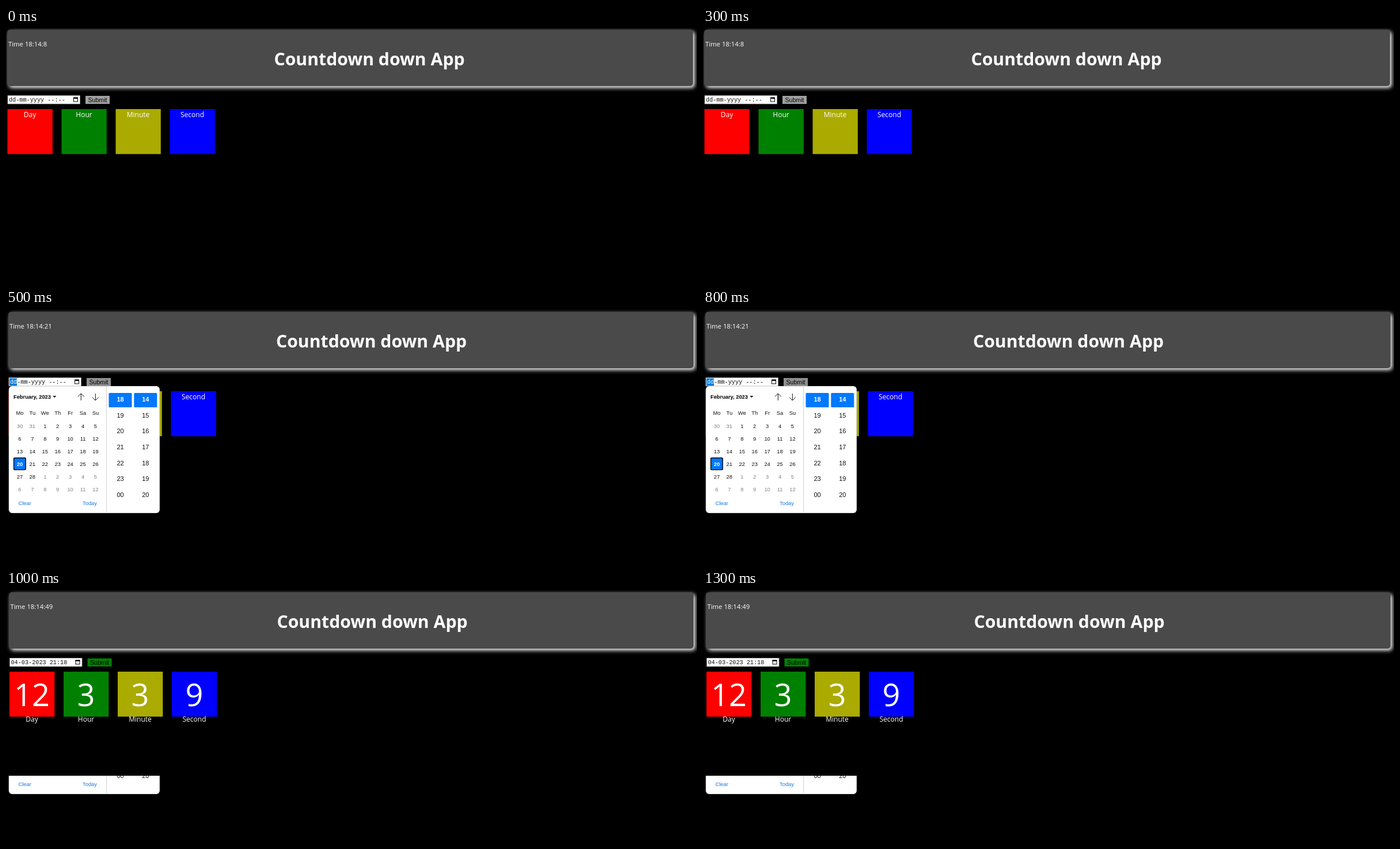
An HTML page with a canvas for the animation above (1500 ms loop, 1200 by 440 pixels).

```html
<!DOCTYPE html>
<html lang="en">
<head>
<meta charset="utf-8">
<title>Countdown</title>
<style>
  html, body { margin: 0; width: 100%; height: 100%; overflow: hidden; background: #000; }
  canvas { display: block; }
</style>
</head>
<body>
<canvas id="stage" width="1200" height="440"></canvas>
<script>
const ctx = document.getElementById('stage').getContext('2d');
const UI = '"Open Sans", sans-serif';
const ARIAL = '"Liberation Sans", sans-serif';
const MONO = '"Liberation Mono", monospace';
const BLUE = '#0078ff';
const STEP = 500;

// x, y: top-left of the page content; titleX: centre of the heading
const scenes = [
  { x: 2.5, y: 0, headerX: 2, right: 1193, titleX: 631, clock: '18:14:8',
    input: 'dd-mm-yyyy --:--', button: '#a0a0a0' },
  { x: 4.5, y: 2, headerX: 4, right: 1194, titleX: 634.5, clock: '18:14:21',
    input: 'dd-mm-yyyy --:--', button: '#8f8f8f', editing: true, pickerTop: 0 },
  { x: 6, y: 1, headerX: 5, right: 1194, titleX: 636, clock: '18:14:49',
    input: '04-03-2023 21:18', button: '#008000', left: [12, 3, 3, 9], pickerTop: 323 }
];

const units = [['Day', '#ff0000'], ['Hour', '#008000'], ['Minute', '#aaaa00'], ['Second', '#0000ff']];

function text(value, x, y, font, color = '#fff', align = 'center') {
  ctx.font = font;
  ctx.fillStyle = color;
  ctx.textAlign = align;
  ctx.fillText(value, x, y);
}

function box(x, y, w, h, color, radius = 0) {
  ctx.fillStyle = color;
  ctx.beginPath();
  ctx.roundRect(x, y, w, h, radius);
  ctx.fill();
}

function stroke(points, color, width = 1) {
  ctx.strokeStyle = color;
  ctx.lineWidth = width;
  ctx.beginPath();
  points.forEach(([x, y]) => ctx.lineTo(x, y));
  ctx.stroke();
}

function drawHeader({ x, y, headerX, right, titleX, clock }) {
  ctx.save();
  ctx.shadowColor = '#fff';
  ctx.shadowBlur = 7;
  ctx.shadowOffsetX = ctx.shadowOffsetY = 3;
  box(headerX, y + 3, right - headerX, 98, '#4a4a4a', 5);
  ctx.restore();
  text('Time ' + clock, x + 1.5, y + 32, `11.3px ${UI}`, '#fff', 'left');
  text('Countdown down App', titleX, y + 65, `bold 30.2px ${UI}`);
}

function drawForm({ x, y, input, button, editing }) {
  const font = `10.2px ${MONO}`;
  box(x, y + 117, 126.5, 15.5, '#767676');
  box(x + 0.8, y + 117.8, 124.9, 13.9, '#fff');
  text(input, x + 2.5, y + 128, font, '#111', 'left');
  if (editing) {
    box(x + 1.5, y + 118.5, 13, 13, '#0078d7');
    text('dd', x + 2.5, y + 128, font, '#fff', 'left');
  }
  ctx.strokeStyle = '#000';
  ctx.lineWidth = 1;
  ctx.strokeRect(x + 115, y + 121.5, 7, 6.5);
  box(x + 114.5, y + 120.5, 8, 2.5, '#000');
  box(x + 135.5, y + 118, 42, 14, button);
  text('Submit', x + 156.5, y + 128.5, `10.6px ${ARIAL}`, '#000');
}

function drawUnits({ x, y, left }) {
  units.forEach(([name, color], i) => {
    const boxX = x + 94 * i, center = boxX + 39;
    box(boxX, y + 141, 78.3, 78.3, color);
    if (left) text(left[i], center, y + 201, `54px ${UI}`);
    text(name, center, y + (left ? 227.5 : 155), `12px ${UI}`);
  });
}

function drawArrow(x, direction) {
  const tip = 153 + 6 * direction, wing = tip - 5.5 * direction;
  stroke([[x, 153 - 6 * direction], [x, tip]], '#111');
  stroke([[x - 5.5, wing], [x, tip], [x + 5.5, wing]], '#111');
}

function drawCalendar() {
  const font = `9.4px ${ARIAL}`;
  text('February, 2023', 13, 155.5, `bold 9.3px ${ARIAL}`, '#000', 'left');
  ctx.fillStyle = '#000';
  ctx.beginPath();
  ctx.moveTo(81.3, 151);
  ctx.lineTo(87.3, 151);
  ctx.lineTo(84.3, 154.3);
  ctx.fill();
  drawArrow(130.3, -1);
  drawArrow(155.3, 1);

  const pitch = 21.93, columnX = i => 23.9 + pitch * i;
  ['Mo', 'Tu', 'We', 'Th', 'Fr', 'Sa', 'Su'].forEach((day, i) => text(day, columnX(i), 184.3, font, '#111'));
  for (let i = 0; i < 42; i++) {
    const date = new Date(2023, 0, 30 + i);
    const x = columnX(i % 7), y = 203.5 + pitch * Math.floor(i / 7);
    const inMonth = date.getMonth() === 1, selected = inMonth && date.getDate() === 20;
    if (selected) {
      box(x - 11, y - 11, 22, 22, '#000', 2);
      box(x - 9.6, y - 9.6, 19.2, 19.2, BLUE, 1);
    }
    text(date.getDate(), x, y + 3.4, (selected ? 'bold ' : '') + font,
      selected ? '#fff' : inMonth ? '#111' : '#808080');
  }
  text('Clear', 32.7, 341, font, '#1a78e0');
  text('Today', 145.5, 341, font, '#1a78e0');
}

function drawTimeColumn(x, first, limit) {
  box(x - 20, 146, 40, 25, BLUE, 1.5);
  for (let i = 0; i < 7; i++) {
    const value = String((first + i) % limit).padStart(2, '0');
    text(value, x, 161.3 + 27.55 * i, `${i ? '' : 'bold '}11px ${ARIAL}`, i ? '#111' : '#fff');
  }
}

function drawPicker(top) {
  ctx.save();
  ctx.beginPath();
  ctx.rect(0, top, 1200, 440);
  ctx.clip();
  box(4.7, 134, 262.3, 221, '#c4c4c4', 6);
  box(5.3, 134.6, 261.1, 219.8, '#fff', 5.5);
  stroke([[174.5, 135], [174.5, 353]], '#d0d0d0');
  drawCalendar();
  drawTimeColumn(198.5, 18, 24);
  drawTimeColumn(242.3, 14, 60);
  ctx.restore();
}

function draw() {
  const scene = scenes[Math.floor(performance.now() / STEP) % scenes.length];
  box(0, 0, 1200, 440, '#000');
  drawHeader(scene);
  drawForm(scene);
  drawUnits(scene);
  if ('pickerTop' in scene) drawPicker(scene.pickerTop);
  requestAnimationFrame(draw);
}
draw();
</script>
</body>
</html>
```
